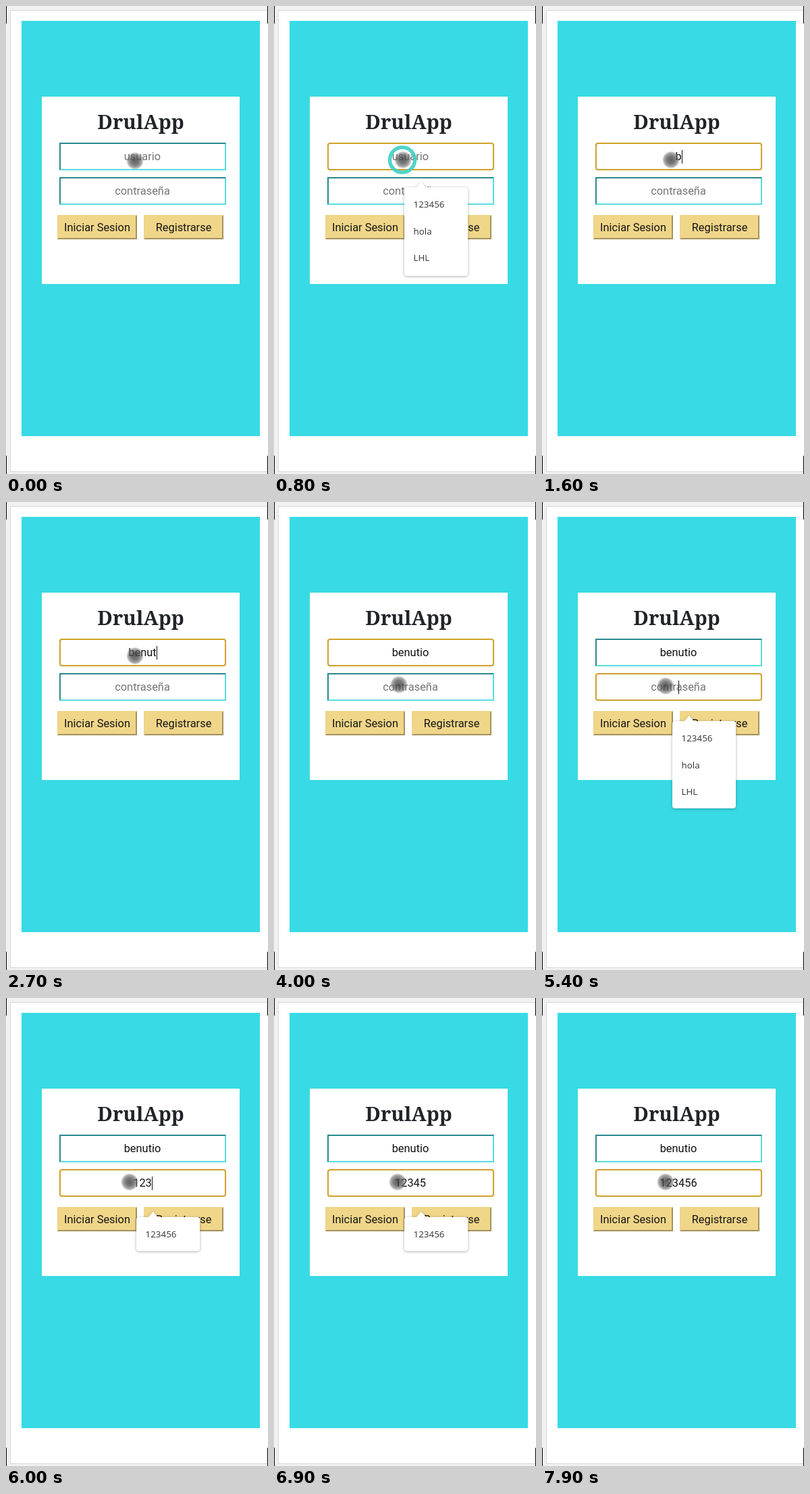
Write an HTML page with a canvas that moves like this. It is 388 px wide and 692 px high and loops after 8000 ms.

```html
<!DOCTYPE html>
<html lang="es">
<head>
<meta charset="utf-8">
<title>Login</title>
<style>
  html, body { margin: 0; width: 100%; height: 100%; overflow: hidden; background: #fff; }
  canvas { display: block; }
</style>
</head>
<body>
<canvas id="stage" width="388" height="692"></canvas>
<script>
const ctx = document.getElementById('stage').getContext('2d');
const LOOP = 8000;
const MID = 202;
const FORM_FONT = '16.4px Roboto, sans-serif';
const LIST_FONT = '13.4px "Open Sans", sans-serif';
const GOLD = '#d0a02b';

// focus time, then the time of each typed letter
const fields = [
  { y: 202, h: 41, hint: 'usuario', value: 'benutio', focus: 300, blur: 4400,
    keys: [1500, 1800, 2000, 2200, 2400, 2900, 3100] },
  { y: 253, h: 41, hint: 'contraseña', value: '123456', focus: 4400, blur: LOOP,
    keys: [5500, 5700, 6000, 6200, 6400, 7400] }
];
const popups = [
  { y: 268, h: 131, open: 600, filter: 1500, close: 1450 },
  { y: 324, h: 129, open: 4500, filter: 5500, close: 7400 }
];
const clicks = [{ at: 500, x: 190, y: 227.5 }, { at: 4400, x: 183.5, y: 271 }];

const clamp = v => Math.max(0, Math.min(1, v));
const ramp = (t, from, to) => clamp((t - from) / (to - from));
const ease = p => p * p * (3 - 2 * p);
const mix = (a, b, p) => a + (b - a) * p;

function rect(x, y, w, h, color) {
  ctx.fillStyle = color;
  ctx.fillRect(x, y, w, h);
}

function text(str, x, y, font, color, align = 'center') {
  ctx.font = font;
  ctx.fillStyle = color;
  ctx.textAlign = align;
  ctx.fillText(str, x, y);
}

function polygon(points, color) {
  ctx.beginPath();
  points.forEach(([x, y]) => ctx.lineTo(x, y));
  ctx.fillStyle = color;
  ctx.fill();
}

function bevel(x, y, w, h, light, dark, fill) {
  const r = x + w, b = y + h;
  rect(x, y, w, h, dark);
  polygon([[x, y], [r, y], [r - 2, y + 2], [x + 2, b - 2], [x, b]], light);
  rect(x + 2, y + 2, w - 4, h - 4, fill);
}

function button(label, x) {
  bevel(x, 309, 118, 36, '#efd587', '#a3925f', '#f0d689');
  text(label, x + 59, 333, FORM_FONT, '#161616');
}

function drawPage() {
  rect(0, 0, 388, 692, '#f1f1f1');
  rect(6, 6, 382, 683, '#d9d9d9');
  rect(7, 7, 381, 681, '#fff');
  for (const x of [0, 387]) {
    rect(x, 0, 1, 26, '#000');
    rect(x, 665, 1, 27, '#000');
  }
  rect(23, 22, 353, 614, '#38dbe5');
  rect(53, 134, 293, 277, '#fff');
  text('DrulApp', 199.5, 182, 'bold 29.5px "Noto Serif", serif', '#212529');
  button('Iniciar Sesion', 76);
  button('Registrarse', 204);
}

function drawField(f, t) {
  const focused = t >= f.focus && t < f.blur;
  if (focused) {
    ctx.beginPath();
    ctx.roundRect(80, f.y + 1, 245, f.h - 2, 3);
    ctx.fillStyle = '#fff';
    ctx.fill();
    ctx.strokeStyle = GOLD;
    ctx.lineWidth = 2;
    ctx.stroke();
  } else {
    bevel(79, f.y, 247, f.h, '#2b898e', '#55dfe1', '#fff');
  }

  const typed = f.keys.filter(k => k <= t);
  const value = f.value.slice(0, typed.length);
  const baseline = f.y + 26;
  text(value || f.hint, MID, baseline, FORM_FONT, value ? '#111' : '#757575');

  const lastKey = typed.length ? typed[typed.length - 1] : f.focus;
  if (focused && (t - lastKey) % 1000 < 500) {
    const half = ctx.measureText(value).width / 2;
    rect(Math.round(MID + half), f.y + 11, 1, 20, '#111');
  }
}

function drawPopup(p, t) {
  const alpha = ramp(t, p.open - 50, p.open + 50) * (1 - ramp(t, p.close, p.close + 150));
  if (!alpha) return;
  const items = t >= p.filter && p.filter < p.close ? ['123456'] : ['123456', 'hola', 'LHL'];
  ctx.save();
  ctx.globalAlpha = alpha;
  ctx.shadowColor = 'rgba(0,0,0,.3)';
  ctx.shadowBlur = 4;
  ctx.shadowOffsetY = 1;
  ctx.beginPath();
  ctx.roundRect(193, p.y, 94, items.length > 1 ? p.h : 50, 4);
  ctx.moveTo(210, p.y + 1);
  ctx.lineTo(218, p.y - 8);
  ctx.lineTo(226, p.y + 1);
  ctx.fillStyle = '#fff';
  ctx.fill();
  ctx.shadowColor = 'transparent';
  items.forEach((s, i) => text(s, 206.5, p.y + 30 + i * 39.6, LIST_FONT, '#333', 'left'));
  ctx.restore();
}

function drawPointer(t) {
  const go = ease(ramp(t, 3700, 4000));
  const settle = ramp(t, 4000, 4200);
  const x = mix(191, 185, go) - 2 * settle;
  const y = mix(mix(229, 227.5, ramp(t, 0, 100)), 270, go) + 2 * settle;
  const shade = ctx.createRadialGradient(x, y, 0, x, y, 12.5);
  shade.addColorStop(0, 'rgba(50,50,50,.78)');
  shade.addColorStop(.5, 'rgba(75,75,75,.72)');
  shade.addColorStop(.8, 'rgba(110,110,110,.6)');
  shade.addColorStop(1, 'rgba(140,140,140,.25)');
  ctx.beginPath();
  ctx.arc(x, y, 12.5, 0, 7);
  ctx.fillStyle = shade;
  ctx.fill();
}

function drawRipple(c, t) {
  const p = (t - c.at) / 600;
  if (p <= 0 || p >= 1) return;
  ctx.save();
  ctx.globalAlpha = .9 * (1 - ramp(p, .5, 1));
  ctx.beginPath();
  ctx.arc(c.x, c.y, 37 * p, 0, 7);
  ctx.strokeStyle = '#40cfc4';
  ctx.lineWidth = 5.5;
  ctx.stroke();
  ctx.restore();
}

function draw(now) {
  const t = now % LOOP;
  drawPage();
  fields.forEach(f => drawField(f, t));
  popups.forEach(p => drawPopup(p, t));
  drawPointer(t);
  clicks.forEach(c => drawRipple(c, t));
}

const start = performance.now();
function tick() {
  draw(performance.now() - start);
  requestAnimationFrame(tick);
}
tick();
</script>
</body>
</html>
```
